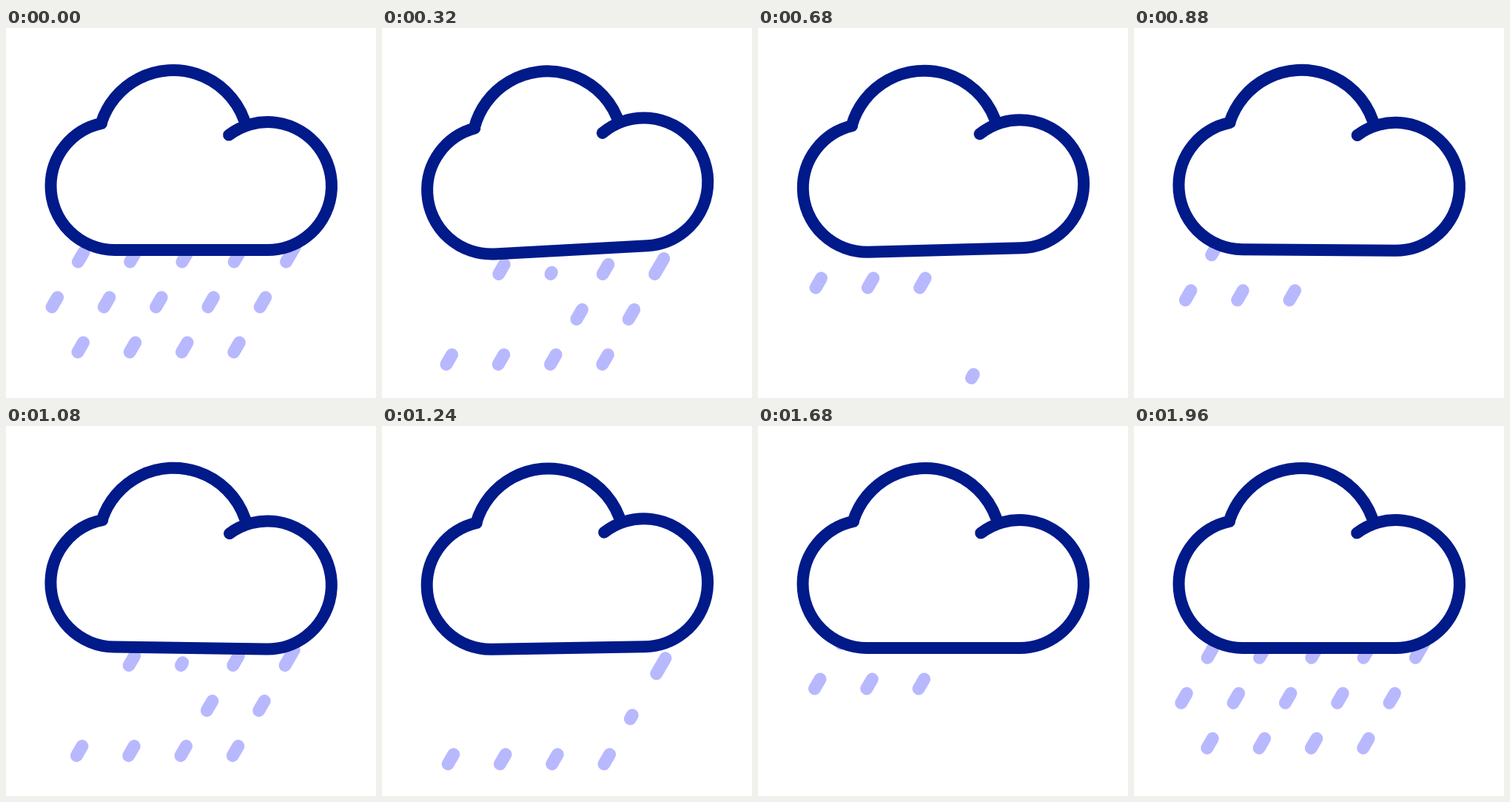
Write an HTML page with a canvas that moves like this. It is 500x500 px and loops after 2 s.

```html
<!DOCTYPE html>
<html lang="en">
<head>
<meta charset="utf-8">
<title>Rain cloud</title>
<style>
html, body { margin: 0; width: 100%; height: 100%; overflow: hidden; background: #fff; }
canvas { display: block; }
</style>
</head>
<body>
<canvas width="500" height="500"></canvas>
<script>
const ctx = document.querySelector('canvas').getContext('2d');
const LOOP = 2000, STEP = 40, TRIM = 45;
const ROW = 61, COL = 70.3, SLOPE = 0.58;

// key points: [time, value]
const tilt = [[0, 0], [400, -3.4], [1020, 1], [1360, -1.7], [1680, 0], [LOOP, 0]];
const fall = [[0, 0], [680, 35], [1080, 68.5], [1400, 91], [1680, 100], [LOOP, 2 * ROW]];

// row and column of each drop, in order of appearance; the first ones lead
const drops = '00 10 11 12 02 13 01 03 14 04 21 22 23 24'.split(' ');
const LEADERS = 4;

// the last wave carries on as the first one of the next loop
const waves = [
  { start: 1405 - LOOP, end: 0 },
  { start: 630, end: 765 },
  { start: 1405, end: LOOP }
];

const linear = p => p;
const smooth = p => (1 - Math.cos(Math.PI * p)) / 2;
const clamp = p => Math.max(0, Math.min(1, p));

function at(keys, t, ease) {
  const i = Math.max(1, keys.findIndex(k => k[0] >= t));
  const [t0, a] = keys[i - 1], [t1, b] = keys[i];
  return a + (b - a) * ease((t - t0) / (t1 - t0));
}

function drawRain(t) {
  const sway = 0.8 + 1.8 * Math.cos(2 * Math.PI * (t - 1250) / LOOP);
  const travel = at(fall, t, linear);
  ctx.strokeStyle = '#b8b8ff';
  ctx.lineWidth = 17;
  ctx.beginPath();
  waves.forEach(({ start, end }, n) => drops.forEach(([row, col], k) => {
    const birth = start + (k < LEADERS ? 0 : 290 + 5 * k);
    const death = end + 164 + 41 * k;
    const grown = clamp((t - birth) / TRIM);
    const left = clamp((death - t) / TRIM);
    if (!grown || !left) return;
    const height = row + col === '04' ? 21 : 13;
    const drop = (row - n) * ROW + travel;
    const point = rise => [62.5 + sway + COL * col - (drop - ROW - rise) * SLOPE, 316 + drop - rise];
    ctx.moveTo(...point(height * left));
    ctx.lineTo(...point(height * (1 - grown) - 0.01));
  }));
  ctx.stroke();
}

function drawCloud(t) {
  ctx.save();
  ctx.translate(250, 205);
  ctx.rotate(at(tilt, t, smooth) * Math.PI / 180);
  ctx.translate(-250, -205);
  ctx.beginPath();
  ctx.arc(353.5, 213.5, 86.5, -2.22, Math.PI / 2);
  ctx.arc(147, 213.5, 86.5, Math.PI / 2, 4.505);
  ctx.arc(226, 159, 102, -2.832, -0.344);
  ctx.fillStyle = '#fff';
  ctx.fill();
  ctx.strokeStyle = '#001a8a';
  ctx.lineWidth = 16;
  ctx.stroke();
  ctx.restore();
}

function draw() {
  const t = Math.floor(performance.now() % LOOP / STEP) * STEP;
  ctx.fillStyle = '#fff';
  ctx.fillRect(0, 0, 500, 500);
  ctx.lineCap = ctx.lineJoin = 'round';
  drawRain(t);
  drawCloud(t);
  requestAnimationFrame(draw);
}
draw();
</script>
</body>
</html>
```
